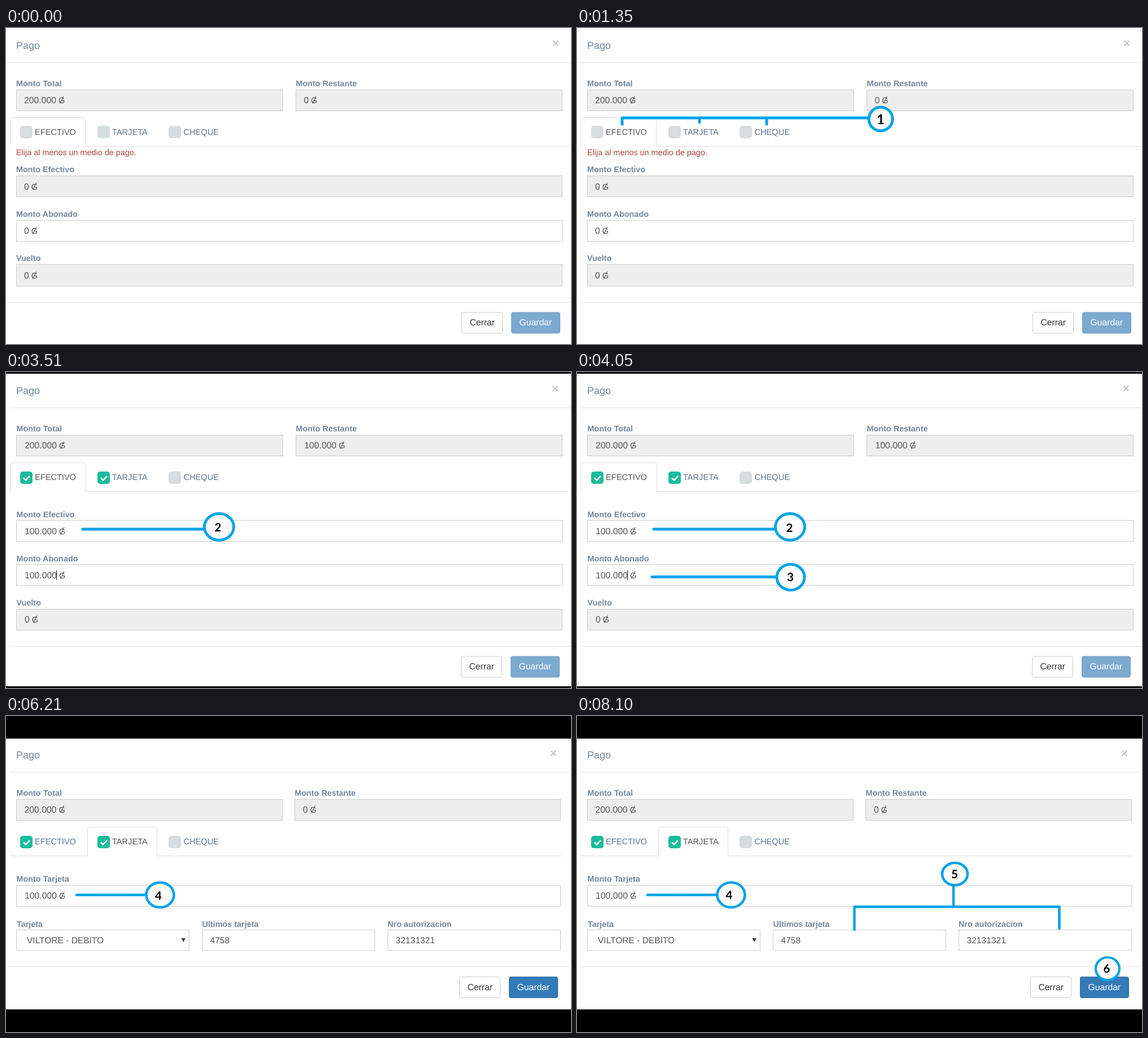
An HTML page for the animation above (9450 ms loop, 1001 by 559 pixels).

```html
<!DOCTYPE html>
<html lang="es">
<head>
<meta charset="utf-8">
<title>Pago</title>
<style>
  html, body { margin: 0; width: 100%; height: 100%; overflow: hidden; background: #fff; }
  svg { display: block; width: 1001px; height: 559px; }
  text { font-family: "Liberation Sans", Arial, sans-serif; text-rendering: geometricPrecision; white-space: pre; }
  .number { font: bold 22px Lato, sans-serif; text-anchor: middle; }
  .callout { fill: none; stroke: #00a2e8; stroke-linecap: round; stroke-linejoin: round; }
</style>
</head>
<body>
<svg id="stage" viewBox="0 0 1001 559"></svg>
<script>
const STEP = 1350;
const SLATE = '#73879c', LINK = '#5a738e', INK = '#555';

const text = (x, y, str, size, fill, extra = '') =>
  `<text x="${x}" y="${y}" font-size="${size}" fill="${fill}" ${extra}>${str}</text>`;
const label = (x, y, str) => text(x, y, str, 14.4, SLATE, 'font-weight="bold"');
const rule = (x1, x2, y, color = '#e5e5e5') => `<path d="M${x1} ${y + .5}H${x2}" stroke="${color}"/>`;
const box = (x1, y1, x2, y2, fill, stroke, radius = 0) =>
  `<rect x="${x1 + .5}" y="${y1 + .5}" width="${x2 - x1 - 1}" height="${y2 - y1 - 1}" rx="${radius}" fill="${fill}" stroke="${stroke}"/>`;
const field = (x1, y1, x2, y2, locked) => box(x1, y1, x2, y2, locked ? '#eee' : '#fff', '#ccc');
const value = (x, y, str) => text(x, y, str, 15.8, INK);

// Amount followed by a slashed G, the guaraní sign
function amount(x, y, str) {
  const dots = str.split('.').length - 1;
  const gx = x + 15.8 * (.556 * (str.length - dots) + .278 * (dots + 1)) - .5;
  return value(x, y, str) + text(gx, y, 'G', 14.5, INK) +
    `<path d="M${gx + 2.5} ${y + 1}L${gx + 9} ${y - 12}" stroke="${INK}" stroke-width="1.1"/>`;
}

function checkbox(x, y, checked) {
  const tick = `<path d="M${x + 6} ${y + 11.5}l4 4 7-7.5" fill="none" stroke="#fff" stroke-width="2.6"/>`;
  return `<rect x="${x}" y="${y}" width="22" height="22" rx="5" fill="${checked ? '#1abc9c' : '#d7dcde'}"/>` +
    (checked ? tick : '');
}

function tabs({ left, right, top, bottom, end, active, checks, boxY, baseline }) {
  const outline = `M7 ${bottom + .5}H${left + .5}V${top + 4.5}q0-4 4-4H${right - 4.5}q4 0 4 4V${bottom + .5}H${end}`;
  return `<path d="${outline}" fill="none" stroke="#ddd"/>` +
    [['EFECTIVO', 25, 51], ['TARJETA', 162, 188], ['CHEQUE', 288, 314.5]].map(([name, x, textX], i) =>
      checkbox(x, boxY, checks[i]) + text(textX, baseline, name, 14.6, i === active ? INK : LINK)).join('');
}

function buttons(x1, x2, y, enabled) {
  const [fill, edge] = enabled ? ['#337ab7', '#2e6da4'] : ['#7ca9d0', '#78a2c8'];
  return box(x1, y, x1 + 73, y + 38, '#fff', '#ccc', 3) + text(x1 + 14.5, y + 23.5, 'Cerrar', 15.7, '#333') +
    box(x2, y, x2 + 87, y + 38, fill, edge, 3) + text(x2 + 14.5, y + 23.5, 'Guardar', 15.7, '#fff');
}

const header = (y, closeX, closeY) => text(18, y, 'Pago', 18, SLATE) +
  text(closeX, closeY, '×', 21, '#c8c8c8', 'font-weight="bold" text-anchor="middle"');

const letterbox = (top, bottom) => `<path d="M0 0H1001V${top}H0zM0 ${bottom}H1001V559H0z"/>`;

const lines = (d, width = 5) => `<path class="callout" d="${d}" stroke-width="${width}"/>`;
const ring = (cx, cy, rx, ry, width = 4.8) =>
  `<ellipse class="callout" cx="${cx}" cy="${cy}" rx="${rx}" ry="${ry}" stroke-width="${width}" style="fill:#fff"/>`;
const number = (x, y, n, size = 20.5) => `<text class="number" x="${x}" y="${y}" style="font-size:${size}px">${n}</text>`;

const emptyForm =
  header(36.5, 974, 34) + rule(2, 1001, 61) +
  label(18, 103, 'Monto Total') + label(513.5, 103, 'Monto Restante') +
  field(18, 109, 491, 147, true) + field(513, 109, 986, 147, true) +
  amount(32, 133, '200.000') + amount(527.5, 133, '0') +
  tabs({ left: 7, right: 141, top: 158, bottom: 209, end: 998, active: 0, checks: [0, 0, 0], boxY: 173, baseline: 189 }) +
  text(18, 225, 'Elija al menos un medio de pago.', 14.4, '#a94442') +
  label(18, 255, 'Monto Efectivo') + field(18, 261, 986, 299, true) + amount(32, 285.5, '0') +
  label(18, 334, 'Monto Abonado') + field(18, 340, 986, 378) + amount(32, 364, '0') +
  label(18, 412, 'Vuelto') + field(18, 418, 986, 457, true) + amount(32, 443, '0') +
  rule(2, 1001, 485) + buttons(807, 895, 502.5, false);

const cashForm = letterbox(3, 556) +
  header(39, 973, 36) + rule(7, 1000, 63) +
  label(18.5, 105, 'Monto Total') + label(513.5, 105, 'Monto Restante') +
  field(18, 111, 491, 149, true) + field(513, 111, 986, 149, true) +
  amount(33, 135, '200.000') + amount(528.5, 135, '100.000') +
  tabs({ left: 7, right: 142, top: 160, bottom: 211, end: 997, active: 0, checks: [1, 1, 0], boxY: 176, baseline: 191 }) +
  label(18.5, 257, 'Monto Efectivo') + field(18, 262, 986, 300) + amount(33, 286.5, '100.000') +
  label(18.5, 335, 'Monto Abonado') + field(18, 340, 986, 378) + amount(33, 364.5, '100.000') +
  '<path d="M89.5 351V368" stroke="#222"/>' +
  label(18.5, 413, 'Vuelto') + field(18, 419, 986, 457, true) + amount(33, 443, '0') +
  rule(7, 1000, 485) + buttons(806, 894, 502.5, false);

const cardForm = letterbox(40, 519) +
  header(75, 970, 73) + rule(8, 998, 99) +
  label(18.5, 141, 'Monto Total') + label(511.5, 141, 'Monto Restante') +
  field(18, 147, 490, 185, true) + field(511, 147, 983, 185, true) +
  amount(32.5, 170.5, '200.000') + amount(526, 170.5, '0') +
  tabs({ left: 144, right: 268, top: 196, bottom: 247, end: 984, active: 1, checks: [1, 1, 0], boxY: 212, baseline: 226.5 }) +
  label(18.5, 293, 'Monto Tarjeta') + field(18, 299, 983, 337) + amount(33, 323, '100.000') +
  label(19, 372.5, 'Tarjeta') + label(347.5, 372.5, 'Ultimos tarjeta') + label(676, 372.5, 'Nro autorizacion') +
  field(18, 378, 325, 415) + field(347, 378, 654, 415) + field(676, 378, 983, 415) +
  text(37, 401.5, 'VILTORE - DEBITO', 15.5, INK) + '<path d="M310.5 393H318L314.2 400z" fill="#444"/>' +
  text(361.5, 401.5, '4758', 15.6, INK) + text(690.5, 401.5, '32131321', 15.6, INK) +
  rule(7, 998, 443) + buttons(803, 891, 461, true);

const methodCallout = lines('M80 170V159H516M217 159V167M336 159V170') + ring(538, 161, 21, 21, 5) + number(538, 169.5, 1, 24);
const cashCallout = lines('M136 278H350') + ring(377.5, 274, 26, 23.5);
const paidCallout = lines('M133 362.5H352') + ring(378.5, 363, 24.5, 22.8);
const cardCallout = lines('M125 316.5H248', 4.6) + ring(273, 316.5, 24.5, 22, 4.5);
const detailCallout = lines('M667 301V337M491.5 378V337.5H854.5V376', 4.5) + ring(669.5, 279.5, 22.5, 19.8, 4.5);
const saveCallout = ring(940, 447, 21, 20, 4.2);

const scenes = [
  emptyForm,
  emptyForm + methodCallout,
  cashForm + cashCallout + number(375.5, 281.5, 2),
  cashForm + cashCallout + number(376.5, 283, 2) + paidCallout + number(378, 370, 3),
  cardForm + cardCallout + number(270, 325, 4),
  cardForm + cardCallout + number(271, 324, 4) + detailCallout + number(669.5, 286.5, 5),
  cardForm + cardCallout + number(269.5, 323.5, 4) + detailCallout + number(669, 287, 5) + saveCallout + number(938.5, 453.5, 6),
];

const stage = document.getElementById('stage');
stage.innerHTML = scenes.map(scene => `<g>${scene}</g>`).join('');

const start = performance.now();
function draw() {
  const current = Math.floor((performance.now() - start) / STEP) % scenes.length;
  [...stage.children].forEach((group, i) => group.style.display = i === current ? '' : 'none');
  requestAnimationFrame(draw);
}
draw();
</script>
</body>
</html>
```
